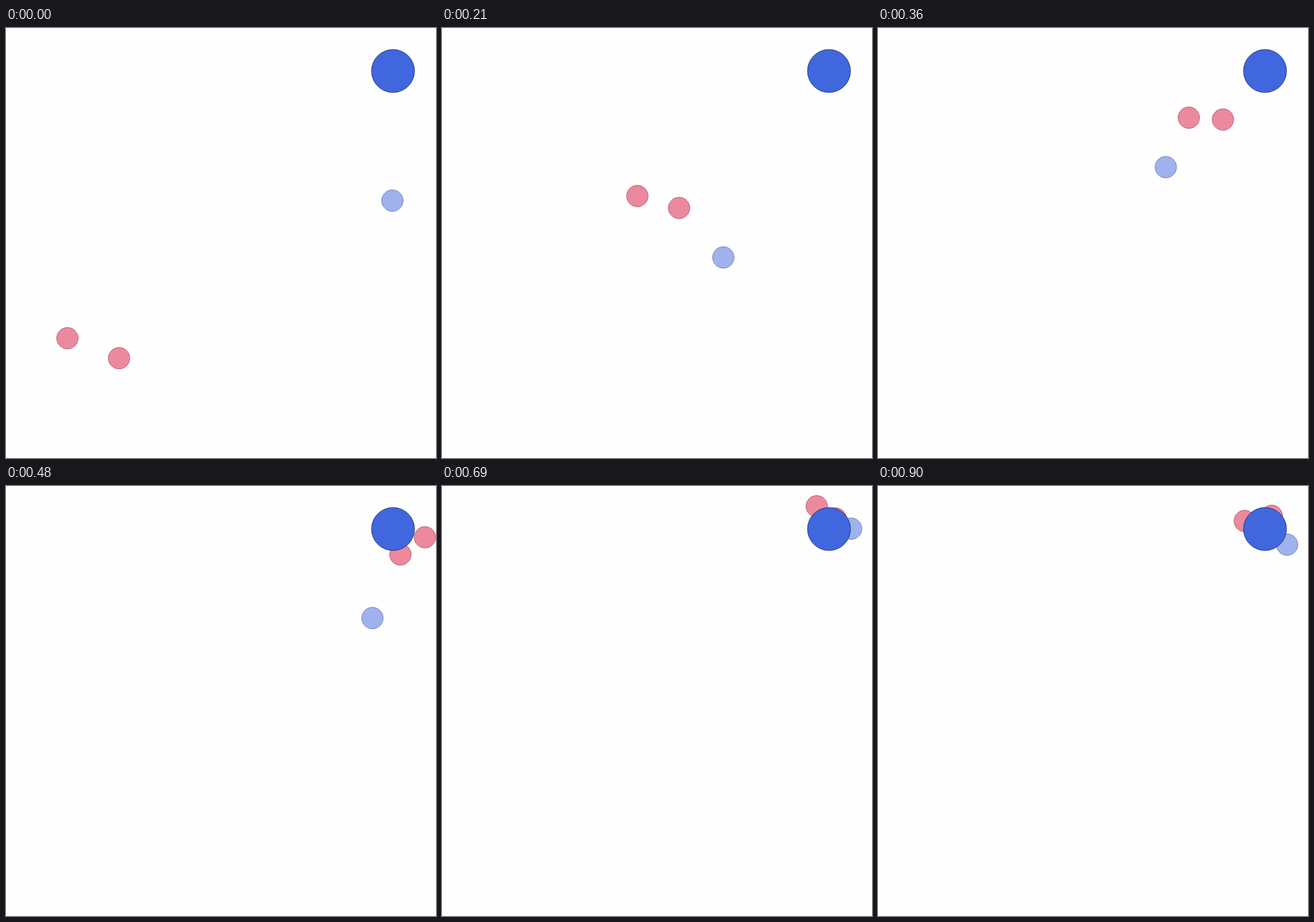
Animation of 700x700 px, one loop 0.93 s. Source, as an HTML page with a canvas:

```html
<!DOCTYPE html>
<html lang="en">
<head>
<meta charset="utf-8">
<title>Arriving balls</title>
<style>
  html, body { margin: 0; width: 100%; height: 100%; overflow: hidden; background: #fefefe; }
  canvas { display: block; }
</style>
</head>
<body>
<canvas id="stage" width="700" height="700"></canvas>
<script>
const STEP = 30, STEPS = 31, SIZE = 700;
const ctx = document.getElementById('stage').getContext('2d');

const BLUE = { fill: '#4067de', line: '#203573' };
const RED = { fill: '#dc143c', line: '#720d28' };
const goal = { x: 630, y: 70, r: 35 };

// All balls pass their key points at the same steps.
const keys = [0, 3, 7, 12, 16, 20, 23, 30];
const balls = [
  { color: RED,
    x: [100, 192, 318, 506, 642, 660, 641, 641],
    y: [505, 404.5, 273.5, 146, 111.5, 68, 53, 48.5] },
  { color: RED,
    x: [184, 261.5, 386, 561.5, 682, 645, 610, 597],
    y: [537.5, 425, 293, 149, 83.5, 25, 33, 57] },
  { color: BLUE,
    x: [629, 559, 458, 468.5, 596.5, 653, 666, 666],
    y: [281, 359, 373.5, 226.5, 215, 127, 69.5, 95.5] }
];

const gap = i => keys[i + 1] - keys[i];
const slope = (p, i) => (p[i + 1] - p[i]) / gap(i);

// Speed at key i: the neighbouring slopes weighted by time; at rest at the end.
function speed(p, i) {
  if (i === 0) return 2 * slope(p, 0) - speed(p, 1);
  if (i === keys.length - 1) return 0;
  const a = gap(i - 1), b = gap(i);
  return (slope(p, i - 1) * b + slope(p, i) * a) / (a + b);
}

// Cubic Hermite curve through the key points.
function at(p, step) {
  const next = keys.findIndex(k => k > step);
  const i = next < 0 ? keys.length - 2 : next - 1;
  const h = gap(i), u = (step - keys[i]) / h, v = 1 - u;
  return v * v * (1 + 2 * u) * p[i] + u * u * (1 + 2 * v) * p[i + 1] +
         h * u * v * (v * speed(p, i) - u * speed(p, i + 1));
}

function disc(x, y, r, { fill, line }, alpha) {
  ctx.globalAlpha = alpha;
  ctx.fillStyle = fill;
  ctx.strokeStyle = line;
  ctx.beginPath();
  ctx.arc(x, y, r, 0, 2 * Math.PI);
  ctx.fill();
  ctx.stroke();
}

function draw(step) {
  ctx.clearRect(0, 0, SIZE, SIZE);
  for (const { color, x, y } of balls) disc(at(x, step), at(y, step), goal.r / 2, color, 0.5);
  disc(goal.x, goal.y, goal.r, BLUE, 1);
}

let start;
function tick(now) {
  start ??= now;
  draw(Math.floor((now - start) / STEP) % STEPS);
  requestAnimationFrame(tick);
}
draw(0);
requestAnimationFrame(tick);
</script>
</body>
</html>
```
